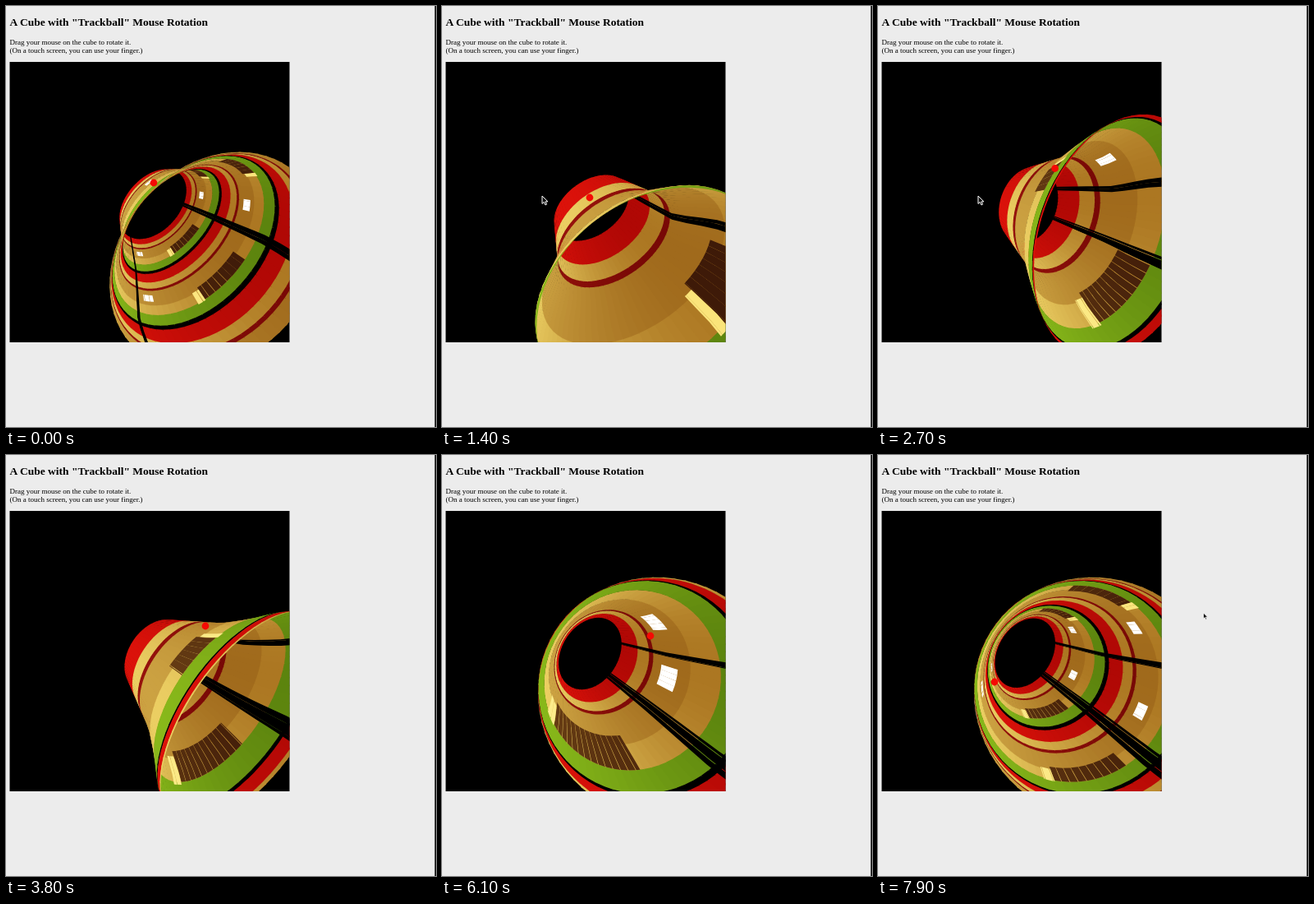
An HTML page with a canvas that plays this animation: 524x512 px, repeating every 8000 ms.

```html
<!DOCTYPE html>
<html lang="en">
<head>
<meta charset="utf-8">
<style>
html, body { margin: 0; width: 100%; height: 100%; overflow: hidden; background: #ececec; }
body { position: relative; }
svg, canvas { position: absolute; left: 0; top: 0; }
text { font-family: "Liberation Serif", "Times New Roman", serif; fill: #000; }
</style>
</head>
<body>
<canvas id="scene" width="524" height="512"></canvas>
<svg width="524" height="512" viewBox="0 0 524 512">
  <text x="4.5" y="24" font-size="13.5" font-weight="bold">A Cube with "Trackball" Mouse Rotation</text>
  <text x="4.5" y="47" font-size="9">Drag your mouse on the cube to rotate it.</text>
  <text x="4.5" y="57.3" font-size="9">(On a touch screen, you can use your finger.)</text>
  <rect x="522.5" width="1.5" height="512"/>
  <path id="cursor" d="M0 0V9.5L2.3 7.4L4 11L5.6 10.2L4 6.9H7Z" fill="#111" stroke="#fff" stroke-width="1"/>
</svg>
<script>
const ctx = document.getElementById('scene').getContext('2d');
const cursor = document.getElementById('cursor');
const LOOP = 8000, STEP = 100, RAD = Math.PI / 180;
const ORIGIN = [178, 240];
const KNOTS = [0, 1, 1.5, 2, 2.5];
const SLICE = 5;

// rings: [offset along axis, radius across, radius along]
// gaps, whites, browns: [angle around axis, half width]
const poseA = {
  axis: 42, zoom: 1,
  rings: [[0, 48, 32], [31, 75, 41], [50, 98, 60], [68, 120, 78], [105, 145, 116]],
  gaps: [[-30, 3], [78, 1.5]],
  whites: [[-51, 5], [66, 5], [195, 5]],
  browns: [[5, 18], [-100, 15]]
};
const poseB = {
  axis: 54, zoom: .38,
  rings: [[0, 47, 31], [58, 80, 48], [86, 118, 68], [116, 150, 94], [146, 160, 124]],
  gaps: [[-69, 4], [40, 0]],
  whites: [[-137, 0], [66, 0], [195, 0]],
  browns: [[-37, 18], [-150, 0]]
};
const poseC = {
  axis: -8, zoom: .38,
  rings: [[0, 43, 33], [40, 78, 70], [54, 113, 92], [80, 140, 125], [97, 155, 145]],
  gaps: [[0, 3], [30, 0]],
  whites: [[-72, 14], [66, 0], [195, 0]],
  browns: [[21, 18], [-150, 0]]
};
const poseD = {
  axis: 35, zoom: .5,
  rings: [[0, 44, 32], [66, 84, 44], [95, 110, 53], [123, 140, 62], [140, 152, 70]],
  gaps: [[-63, 3], [-8, 5]],
  whites: [[-72, 0], [-20, 0], [142, 0]],
  browns: [[42, 28], [-165, 16]]
};
const poseE = {
  axis: 32, zoom: .5,
  rings: [[0, 44, 31], [32, 75, 70], [60, 106, 101], [80, 130, 128], [108, 146, 155]],
  gaps: [[-41, 2], [13, 5]],
  whites: [[-77, 10], [-20, 10], [142, 0]],
  browns: [[86, 34], [-105, 0]]
};
const poseF = {
  ...poseE, zoom: 1,
  whites: [[-67, 5], [-8, 5], [142, 5]],
  browns: [[47, 22], [-105, 18]]
};

const poseTrack = [
  [0, poseA], [1100, poseB], [1400, poseB], [2100, poseC], [2200, poseC],
  [3000, poseD], [4300, poseD], [5000, poseE], [7000, poseE], [7900, poseF]
];
const dotTrack = [
  [0, [180, 215]], [1100, [180, 233]], [1400, [180, 233]], [2100, [170, 180]],
  [2200, [170, 180]], [3000, [243, 208]], [4200, [243, 208]], [4900, [260, 240]],
  [5200, [260, 240]], [6100, [254, 220]], [6300, [284, 168]], [6550, [323, 290]],
  [6800, [235, 378]], [7000, [142, 276]]
];
const cursorTrack = [
  [1000, 3400, 122, 231, 1], [4400, 5200, 262, 268, .8], [7800, 8000, 396.5, 192, .75]
];

// dark and light ends of each material
const PAINT = {
  yellow: [[172, 119, 34], [235, 206, 98]],
  tan: [[160, 106, 28], [204, 162, 66]],
  red: [[176, 8, 5], [220, 18, 10]],
  wine: [[120, 8, 6], [150, 18, 12]],
  green: [[92, 132, 14], [136, 184, 26]],
  brown: [[62, 26, 8], [104, 62, 20]],
  pale: [[250, 228, 122], [252, 236, 140]],
  white: [[255, 255, 255], [255, 255, 255]],
  black: [[0, 0, 0], [0, 0, 0]]
};
const BANDS = [
  [0, .045, 'black'], [.045, .2, 'red'], [.2, .31, 'yellow'], [.31, .35, 'wine'],
  [.35, .62, 'tan'], [.62, .8, 'yellow'], [.8, 1, 'green']
];

function mix(a, b, f) {
  if (typeof a === 'number') return a + (b - a) * f;
  if (Array.isArray(a)) return a.map((x, i) => mix(x, b[i], f));
  return Object.fromEntries(Object.keys(a).map(k => [k, mix(a[k], b[k], f)]));
}

function sample(track, t) {
  const next = track.findIndex(key => key[0] > t);
  if (next < 0) return track[track.length - 1][1];
  const [t0, a] = track[next - 1], [t1, b] = track[next];
  return mix(a, b, (t - t0) / (t1 - t0));
}

function surface(pose) {
  const ca = Math.cos(pose.axis * RAD), sa = Math.sin(pose.axis * RAD);
  return (u, v) => {
    let i = 0;
    while (i < KNOTS.length - 2 && u > KNOTS[i + 1]) i++;
    const f = (u - KNOTS[i]) / (KNOTS[i + 1] - KNOTS[i]);
    const [offset, across, along] = mix(pose.rings[i], pose.rings[i + 1], f);
    const x = offset + along * Math.cos(v * RAD), y = across * Math.sin(v * RAD);
    return [ORIGIN[0] + x * ca - y * sa, ORIGIN[1] + x * sa + y * ca];
  };
}

function tone(name, v) {
  const light = .5 - .5 * Math.cos((v + 35) * RAD);
  return `rgb(${mix(...PAINT[name], light).map(Math.round)})`;
}

function drawSurface(pose) {
  const at = surface(pose), umax = KNOTS[KNOTS.length - 1];

  function patch(u0, u1, v0, v1, color) {
    u1 = Math.min(u1, umax);
    if (u0 >= u1) return;
    const n = Math.ceil((u1 - u0) / .2);
    ctx.beginPath();
    for (let i = 0; i <= n; i++) ctx.lineTo(...at(u0 + (u1 - u0) * i / n, v0));
    for (let i = n; i >= 0; i--) ctx.lineTo(...at(u0 + (u1 - u0) * i / n, v1));
    ctx.fillStyle = color;
    ctx.fill();
  }

  function slice(v) {
    const end = v + SLICE, middle = v + SLICE / 2;
    // clip a feature to this slice, allowing for wrapped angles
    const feature = (t0, t1, from, to, name) => {
      for (const turn of [-360, 0, 360]) {
        const a = Math.max(v, from + turn), b = Math.min(end, to + turn);
        if (a >= b) continue;
        patch(t0 / pose.zoom, t1 / pose.zoom, a, b + (b === end ? .4 : 0), tone(name, middle));
      }
    };
    for (let j = 0; j < umax * pose.zoom; j++) {
      for (const [t0, t1, name] of BANDS)
        patch((j + t0) / pose.zoom, (j + t1) / pose.zoom + .012, v - .4, end + .4, tone(name, middle));
      for (const [a, w] of pose.browns) {
        if (w < .5) continue;
        feature(j + .56, j + .8, a - w, a + w, 'brown');
        feature(j + .6, j + .82, a + w, a + w * 1.3, 'pale');
      }
      for (const [a, w] of pose.whites)
        feature(j + .43, j + .55, a - w, a + w, 'white');
    }
    for (const [a, w] of pose.gaps)
      feature(0, umax * pose.zoom, a - w, a + w, 'black');
  }

  // far wall first, near wall last
  for (let v = 0; v < 180; v += SLICE) {
    slice(v);
    slice(-v - SLICE);
  }
}

function draw(t) {
  ctx.clearRect(0, 0, 524, 512);
  ctx.save();
  ctx.beginPath();
  ctx.rect(4.5, 68, 341, 341);
  ctx.fillStyle = '#000';
  ctx.fill();
  ctx.clip();
  drawSurface(sample(poseTrack, t));
  const [x, y] = sample(dotTrack, t);
  ctx.beginPath();
  ctx.arc(x, y, 4.4, 0, 2 * Math.PI);
  ctx.fillStyle = '#f50a04';
  ctx.fill();
  ctx.restore();

  const spot = cursorTrack.find(([from, to]) => t >= from && t < to);
  cursor.style.display = spot ? '' : 'none';
  if (spot) cursor.setAttribute('transform', `translate(${spot[2]} ${spot[3]}) scale(${spot[4]})`);
}

const start = performance.now();
let shown = -1;
function tick() {
  const elapsed = Math.max(0, performance.now() - start) % LOOP;
  const t = Math.floor(elapsed / STEP) * STEP;
  if (t !== shown) draw(shown = t);
  requestAnimationFrame(tick);
}
tick();
</script>
</body>
</html>
```
